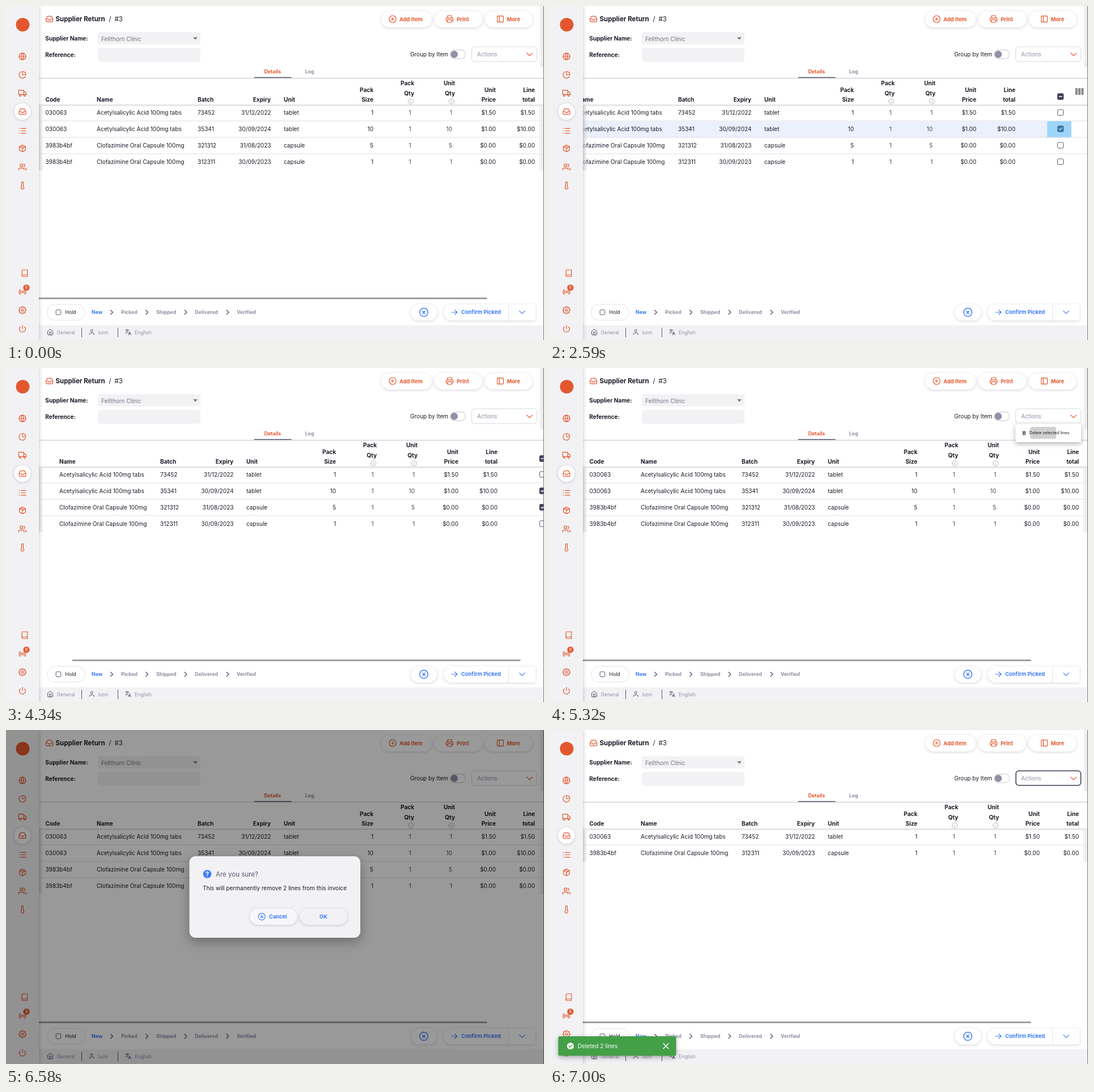
An HTML page for the animation above (7.63 s loop, 949 by 590 pixels).

```html
<!DOCTYPE html>
<html lang="en">
<head>
<meta charset="utf-8">
<title>Supplier return</title>
<style>
  html, body { margin: 0; width: 100%; height: 100%; overflow: hidden; background: #fff; }
  svg { display: block; width: 949px; height: 590px; }
  text { font: 400 10.05px Inter, "Open Sans", sans-serif; }
  .b { font-weight: 700; }
  .title { font-size: 11.5px; }
  .btn { font-size: 9.3px; font-weight: 700; }
  .small { font-size: 8.75px; }
  .tiny { font-size: 7.2px; }
  .end { text-anchor: end; }
  .mid { text-anchor: middle; }
  .raised { filter: drop-shadow(0 1.5px 2.5px rgba(0,0,0,.17)); }
  .side { filter: drop-shadow(1px 0 3px rgba(0,0,0,.2)); }
  .popup { filter: drop-shadow(0 3px 4px rgba(0,0,0,.3)); }
  .modal { filter: drop-shadow(0 7px 10px rgba(0,0,0,.3)); }
</style>
</head>
<body>
<svg id="stage" viewBox="0 0 949 590"></svg>
<script>
const LOOP = 7630;
const ORANGE = '#e4572e', BLUE = '#3e7bfa', INK = '#1c1c28', GREY = '#8f90a6',
      SLATE = '#555770', PALE = '#f2f2f5', GREEN = '#43a047';

const ring = (x, y, r) => `M${x - r} ${y}a${r} ${r} 0 1 0 ${2 * r} 0a${r} ${r} 0 1 0 ${-2 * r} 0z`;

function gear() {
  let d = '';
  for (let i = 0; i < 96; i++) {
    const a = i / 96 * 2 * Math.PI, r = 9.4 + 1.5 * Math.tanh(2 * Math.cos(8 * a));
    d += `${i ? 'L' : 'M'}${(12 + r * Math.cos(a)).toFixed(2)} ${(12 + r * Math.sin(a)).toFixed(2)}`;
  }
  return d + 'z' + ring(12, 12, 3.2);
}

// Icons on a 24 x 24 grid
const ICONS = {
  globe: ring(12, 12, 10) + 'M2 12h20M12 2a15.3 15.3 0 0 1 0 20a15.3 15.3 0 0 1 0-20z',
  pie: 'M21.2 15.9A10 10 0 1 1 8 2.8M22 12A10 10 0 0 0 12 2v10z',
  truck: 'M1 3h15v13H1zM16 8h4l3 3v5h-7z' + ring(5.5, 18.5, 2.5) + ring(18.5, 18.5, 2.5),
  inbox: 'M22 12h-6l-2 3h-4l-2-3H2M5.5 5.1L2 12v6a2 2 0 0 0 2 2h16a2 2 0 0 0 2-2v-6l-3.5-6.9A2 2 0 0 0 16.8 4H7.2a2 2 0 0 0-1.7 1.1z',
  list: 'M8 5h14M8 12h14M8 19h14M2 5h1M2 12h1M2 19h1',
  box: 'M16.5 9.4l-9-5.2M21 16V8a2 2 0 0 0-1-1.7l-7-4a2 2 0 0 0-2 0l-7 4A2 2 0 0 0 3 8v8a2 2 0 0 0 1 1.7l7 4a2 2 0 0 0 2 0l7-4a2 2 0 0 0 1-1.7zM3.3 7L12 12l8.7-5M12 22V12',
  users: 'M17 21v-2a4 4 0 0 0-4-4H5a4 4 0 0 0-4 4v2M23 21v-2a4 4 0 0 0-3-3.9M16 3.1a4 4 0 0 1 0 7.8' + ring(9, 7, 4),
  thermo: 'M14.5 14.8V3.5a2.5 2.5 0 0 0-5 0v11.3a4.5 4.5 0 1 0 5 0z',
  book: 'M4 19.5A2.5 2.5 0 0 1 6.5 17H20M6.5 2H20v20H6.5A2.5 2.5 0 0 1 4 19.5v-15A2.5 2.5 0 0 1 6.5 2z',
  radio: ring(12, 12, 2) + 'M16.2 7.8a6 6 0 0 1 0 8.5M7.8 16.2a6 6 0 0 1 0-8.5M19.1 4.9a10 10 0 0 1 0 14.2M4.9 19.1a10 10 0 0 1 0-14.2',
  gear: gear(),
  power: 'M18.4 6.6a9 9 0 1 1-12.8 0M12 2v10',
  plus: ring(12, 12, 10) + 'M12 8v8M8 12h8',
  print: 'M6 9V2h12v7M6 18H4a2 2 0 0 1-2-2v-5a2 2 0 0 1 2-2h16a2 2 0 0 1 2 2v5a2 2 0 0 1-2 2h-2M6 14h12v8H6z',
  panel: 'M5 3h14a2 2 0 0 1 2 2v14a2 2 0 0 1-2 2H5a2 2 0 0 1-2-2V5a2 2 0 0 1 2-2zM9 3v18',
  cancel: ring(12, 12, 10) + 'M15 9l-6 6M9 9l6 6',
  arrow: 'M4 12h16M13 5l7 7-7 7',
  down: 'M4 8l8 8 8-8',
  next: 'M8 20l8-8-8-8',
  home: 'M3 9l9-7 9 7v11a2 2 0 0 1-2 2H5a2 2 0 0 1-2-2zM9 22V12h6v10',
  user: 'M20 21v-2a4 4 0 0 0-4-4H8a4 4 0 0 0-4 4v2' + ring(12, 7, 4),
  lang: 'M2 5h13M8 2v3M12 5c-1 5-5 9-9 11M5 9c1 3 4 5 6 6M12 22l5-11 5 11M14 18h6',
  info: ring(12, 12, 10) + 'M12 11v6M12 7v.5',
  bin: 'M4 6h16M9 6V3h6v3M6 6v15h12V6M10 10v7M14 10v7',
  close: 'M4 4l16 16M20 4L4 20',
  tick: 'M5 12l5 5 9-10',
  dash: 'M5 12h14'
};

const icon = (name, x, y, color = ORANGE, scale = .6, width = 2) =>
  `<path d="${ICONS[name]}" transform="translate(${x} ${y}) scale(${scale}) translate(-12 -12)"
    fill="none" stroke="${color}" stroke-width="${width}" stroke-linecap="round" stroke-linejoin="round"/>`;
const text = (x, y, str, cls = '', fill = INK) =>
  `<text x="${x}" y="${y}" class="${cls}" fill="${fill}">${str}</text>`;
const rect = (x, y, w, h, fill, r = 0, more = '') =>
  `<rect x="${x}" y="${y}" width="${w}" height="${h}" rx="${r}" fill="${fill}" ${more}/>`;
const disc = (x, y, r, fill, more = '') => `<circle cx="${x}" cy="${y}" r="${r}" fill="${fill}" ${more}/>`;
const group = (id, body, more = '') => `<g id="${id}" ${more}>${body}</g>`;
const raised = 'class="raised"';

const pillButton = (x, w, name, ix, tx, label) =>
  rect(x, 9, w, 29, '#fff', 14.5, raised) + icon(name, ix, 23) + text(tx, 26.5, label, 'btn', ORANGE);

const checkbox = (y, id, mark = 'tick') =>
  rect(1007.4, y - 5.1, 10.2, 10.2, '#fff', 2, `stroke="${SLATE}" stroke-width="1"`) +
  (id ? group(id, rect(1006.9, y - 5.6, 11.2, 11.2, '#3f4058', 2) + icon(mark, 1012.5, y, '#fff', .36, 4)) : '');

const ROWS = [
  ['030063', 'Acetylsalicylic Acid 100mg tabs', '73452', '31/12/2022', 'tablet', 1, '$1.50', '$1.50'],
  ['030063', 'Acetylsalicylic Acid 100mg tabs', '35341', '30/09/2024', 'tablet', 10, '$1.00', '$10.00'],
  ['3983b4bf', 'Clofazimine Oral Capsule 100mg', '321312', '31/08/2023', 'capsule', 5, '$0.00', '$0.00'],
  ['3983b4bf', 'Clofazimine Oral Capsule 100mg', '312311', '30/09/2023', 'capsule', 1, '$0.00', '$0.00']
];

function tableRow([code, name, batch, expiry, unit, size, price, total], i) {
  const top = 175 + 29 * i, y = top + 17.2, picked = i === 1 || i === 2;
  return group('row' + i,
    (picked ? group('hover' + i, rect(58, top, 974, 28.5, '#ebf0fd')) : '') +
    (i ? rect(58, top - 1.5, 1002, 1, '#e0e0e4') : '') +
    text(69.5, y, code) + text(160, y, name) + text(338, y, batch) + text(467.5, y, expiry, 'end') +
    text(490, y, unit) + text(648, y, size, 'end') + text(714.5, y, 1, 'end', '#44454f') +
    text(787, y, size, 'end', '#44454f') + text(864, y, price, 'end') + text(933, y, total, 'end') +
    checkbox(top + 13, picked && 'check' + i) +
    (picked ? group('tap' + i, rect(989, top - .5, 42.5, 29, 'rgba(66,180,245,.45)')) : ''));
}

function tableHead() {
  const cols = [[648, 'Pack', 'Size', 0], [720, 'Pack', 'Qty', 1], [792, 'Unit', 'Qty', 1],
                [864, 'Unit', 'Price', 0], [933, 'Line', 'total', 0]];
  const single = [[69.5, 'Code', 'b'], [160, 'Name', 'b'], [338, 'Batch', 'b'], [467, 'Expiry', 'b end'], [490, 'Unit', 'b']];
  return single.map(([x, s, c]) => text(x, 169.2, s, c)).join('') +
    cols.map(([x, a, b, info]) => {
      const y = info ? 140.2 : 151.8;
      return text(x, y, a, 'b end') + text(x, y + 17.5, b, 'b end') +
        (info ? icon('info', x - 6, 168.5, '#a5a6b4', .46, 1.8) : '');
    }).join('') +
    checkbox(160, 'checkAll', 'dash') +
    [0, 1, 2].map(i => rect(1038.5 + i * 5.3, 145, 4.2, 12, '#8c8c8c', 1)).join('');
}

const table =
  `<g clip-path="url(#view)">` +
    group('scroll', ROWS.map(tableRow).join('') + tableHead()) +
  `</g>` +
  rect(58, 127, 890, 1, '#c4c4cc') + rect(58, 174.5, 890, 1, '#c2c2c6') + rect(58, 175.5, 890, 1.5, '#ececee') +
  rect(58, 177, 7, 56, 'url(#edgeL)') + group('edgeLow', rect(58, 233, 7, 57, 'url(#edgeL)')) +
  group('edgeRight', rect(940, 177, 8, 56, 'url(#edgeR)') +
    group('edgeRightLow', rect(940, 233, 8, 57, 'url(#edgeR)'))) +
  group('bar', rect(58, 515, 790.5, 2.8, '#999'));

const header =
  rect(941, 0, 7, 108, 'url(#edgeR)') +
  icon('inbox', 76.7, 23) + text(87.5, 26.8, 'Supplier Return', 'title b') +
  text(181.5, 26.8, '/', 'title') + text(191.5, 26.8, '#3', 'title') +
  text(69.3, 60.8, 'Supplier Name:', 'b') + rect(162, 46.5, 181, 21.5, PALE, 4) +
  text(168, 61.8, 'Fellthorn Clinic', '', '#75767f') + '<path d="M330 55.2h8l-4 4.3z" fill="#777"/>' +
  text(69.3, 89.6, 'Reference:', 'b') + rect(162, 74, 181, 24.5, PALE, 5) +
  pillButton(662, 89, 'plus', 682, 694, 'Add Item') +
  pillButton(755.5, 84.5, 'print', 782.5, 795, 'Print') +
  pillButton(844.5, 84.5, 'panel', 872, 883.5, 'More') +
  text(713, 89, 'Group by Item') +
  rect(783.5, 77.7, 27, 15.4, '#fff', 7.7, 'stroke="#c3c4ce"') + disc(790.7, 85.4, 6.3, GREY) +
  rect(821.5, 72, 115, 26, '#fff', 5, 'stroke="#d9d9e0"') +
  group('focus', rect(821.8, 72.3, 114.6, 25.4, 'none', 5, 'stroke="#3f4058" stroke-width="1.6"')) +
  text(831, 89.2, 'Actions', '', GREY) + icon('down', 923.5, 85.5, ORANGE, .6, 2.2) +
  text(470.3, 119.3, 'Details', 'small b mid', ORANGE) + text(535.6, 119.3, 'Log', 'small b mid', GREY) +
  rect(438, 125.6, 65.5, 1.8, SLATE);

const sidebar =
  rect(0, 0, 58, 590, PALE, 0, 'class="side"') +
  disc(29.5, 33, 12, ORANGE) + disc(29, 186.5, 14.5, '#fff', raised) +
  [['globe', 89], ['pie', 121.5], ['truck', 154], ['inbox', 186.5], ['list', 220.5], ['box', 251.5],
   ['users', 284.5], ['thermo', 317], ['radio', 505], ['gear', 537.3], ['power', 570]]
    .map(([n, y]) => icon(n, 29, y)).join('') +
  icon('book', 33, 472) +
  disc(36, 497.5, 5.6, ORANGE) + text(36, 500, '8', 'tiny mid', '#fff');

const footer =
  rect(58, 518, 890, 46, '#fff') + rect(58, 564, 890, 26, PALE) +
  rect(72.5, 527, 67, 28, '#fff', 14, 'stroke="#e3e3e9"') +
  rect(88.2, 536.7, 8.6, 8.6, '#fff', 1.5, `stroke="${SLATE}"`) + text(104.5, 544.2, 'Hold', 'small') +
  [[151, 'New'], [203, 'Picked'], [265, 'Shipped'], [333.3, 'Delivered'], [407, 'Verified']]
    .map(([x, s], i) => text(x, 543.8, s, 'small b', i ? GREY : BLUE)).join('') +
  [186.5, 248.5, 317, 391].map(x => icon('next', x, 541, SLATE, .48, 2.8)).join('') +
  rect(714, 527, 46.5, 28.5, '#fff', 14.25, raised) + icon('cancel', 737, 541, BLUE, .73) +
  `<path d="M786 527H930a4 4 0 0 1 4 4V551.500a4 4 0 0 1-4 4H786a14.250 14.250 0 0 1 0-28.500z" fill="#fff" ${raised}/>` +
  rect(886, 527, 1, 28.5, '#e6e6ec') + icon('arrow', 791, 541) .replace(ORANGE, BLUE) +
  text(803, 544.4, 'Confirm Picked', 'btn', BLUE) + icon('down', 910.5, 541, BLUE) +
  icon('home', 78, 576, SLATE, .5) + text(89.5, 580, 'General', 'small', GREY) + rect(133, 568, 1, 17, SLATE) +
  icon('user', 151.3, 576, SLATE, .5) + text(163, 580, 'lumi', 'small', GREY) + rect(197, 568, 1, 17, SLATE) +
  icon('lang', 215.5, 576, SLATE, .5) + text(227, 580, 'English', 'small', GREY);

const menu = group('menu',
  rect(821, 98, 116, 33, '#fff', 3, 'class="popup"') +
  group('ripple', rect(847, 104, 46, 21, '#d0d0d0', 4)) +
  icon('bin', 836.3, 115, '#333', .34, 2.6) + text(845.5, 117.4, 'Delete selected lines', 'tiny'));

const dialog = group('dialog',
  rect(323.5, 223, 301.5, 144, PALE, 11, 'class="modal"') +
  disc(355, 254.5, 7.3, BLUE) + text(355, 258.5, '?', 'title b mid', '#fff') +
  text(370, 258.7, 'Are you sure?', 'title', SLATE) +
  text(347, 283, 'This will permanently remove 2 lines from this invoice') +
  rect(430, 315.5, 83.5, 28.5, '#f7f7f9', 14.25, raised) + icon('cancel', 451.3, 329.7, BLUE) +
  text(464, 333.2, 'Cancel', 'btn', BLUE) +
  rect(518.5, 315.5, 83.5, 28.5, '#f2f2f5', 14.25, 'id="ok" ' + raised) +
  `<text id="okText" x="560" y="333.2" class="btn mid">OK</text>`);

const toast = group('toast',
  rect(14.5, 541, 208, 34.5, GREEN, 3, 'class="popup"') +
  disc(36, 558.3, 6, '#fff') + icon('tick', 36, 558.3, GREEN, .4, 3.4) +
  text(49, 562, 'Deleted 2 lines', '', '#fff') + icon('close', 204.5, 558.3, '#fff', .56, 2.6));

document.getElementById('stage').innerHTML =
  `<defs>
    <clipPath id="view"><rect x="58" y="128" width="890" height="387"/></clipPath>
    <linearGradient id="edgeL"><stop stop-color="#d4d4d8" stop-opacity=".7"/><stop offset="1" stop-color="#e8e8ea" stop-opacity=".3"/></linearGradient>
    <linearGradient id="edgeR"><stop stop-color="#eee" stop-opacity=".5"/><stop offset="1" stop-color="#e6e6e8"/></linearGradient>
  </defs>` +
  rect(0, 0, 949, 590, '#fff') + header + table + footer + sidebar +
  rect(948, 0, 1, 590, '#77777c') + menu +
  group('shade', rect(0, 0, 949, 590, '#000')) + dialog + toast;

// Each step is [time in ms, value]; a value holds until the next step.
function play(id, prop, steps) {
  const all = steps[0][0] ? [[0, steps[0][1]], ...steps] : steps;
  const frames = all.map(([t, v]) => ({ offset: t / LOOP, [prop]: v, easing: 'step-end' }));
  frames.push({ offset: 1, [prop]: all[all.length - 1][1] });
  document.getElementById(id).animate(frames, { duration: LOOP, iterations: Infinity });
}
const fade = (id, steps) => play(id, 'opacity', steps);
const slide = (id, axis, steps) => play(id, 'transform', steps.map(([t, v]) => [t, `translate${axis}(${v}px)`]));
const on = (id, from, to) => fade(id, to ? [[0, 0], [from, 1], [to, 0]] : [[0, 0], [from, 1]]);
const off = (id, time) => fade(id, [[0, 1], [time, 0]]);

const SCROLL = [[0, 0], [490, 22], [560, 72], [630, 102], [700, 112], [4340, 66], [4410, 16], [4480, 0]];
slide('scroll', 'X', SCROLL.map(([t, x]) => [t, -x]));
slide('bar', 'X', SCROLL.map(([t, x]) => [t, x * .888]));
fade('bar', [[0, 1], [1050, .75], [1120, .45], [1190, .18], [1260, 0], [4340, 1]]);
fade('edgeRight', [[0, 1], [490, 0], [4480, 1]]);

on('checkAll', 2590);
on('check1', 2590);
on('hover1', 2590, 2730);
on('tap1', 2590, 2730);
on('check2', 3500);
on('hover2', 3500, 3570);
on('tap2', 3500, 3570);

fade('menu', [[0, 0], [5180, .6], [5250, 1], [5390, .45], [5460, .04], [5530, 0]]);
on('ripple', 5320);

const DIALOG = [[0, 0], [5390, .5], [5460, .96], [5530, 1], [6650, .97], [6720, .72], [6790, .3], [6860, .04], [6930, 0]];
fade('dialog', DIALOG);
fade('shade', DIALOG.map(([t, v]) => [t, v * .4]));
play('ok', 'fill', [[0, BLUE], [6440, PALE]]);
play('okText', 'fill', [[0, '#fff'], [6440, BLUE]]);

const GONE = 6650;
off('row1', GONE);
off('row2', GONE);
off('edgeLow', GONE);
off('edgeRightLow', GONE);
slide('row3', 'Y', [[0, 0], [GONE, -58]]);
on('focus', 6720);
slide('toast', 'X', [[0, -260], [6720, -150], [6790, -51], [6860, -15], [6930, -3], [7000, 0]]);
</script>
</body>
</html>
```
